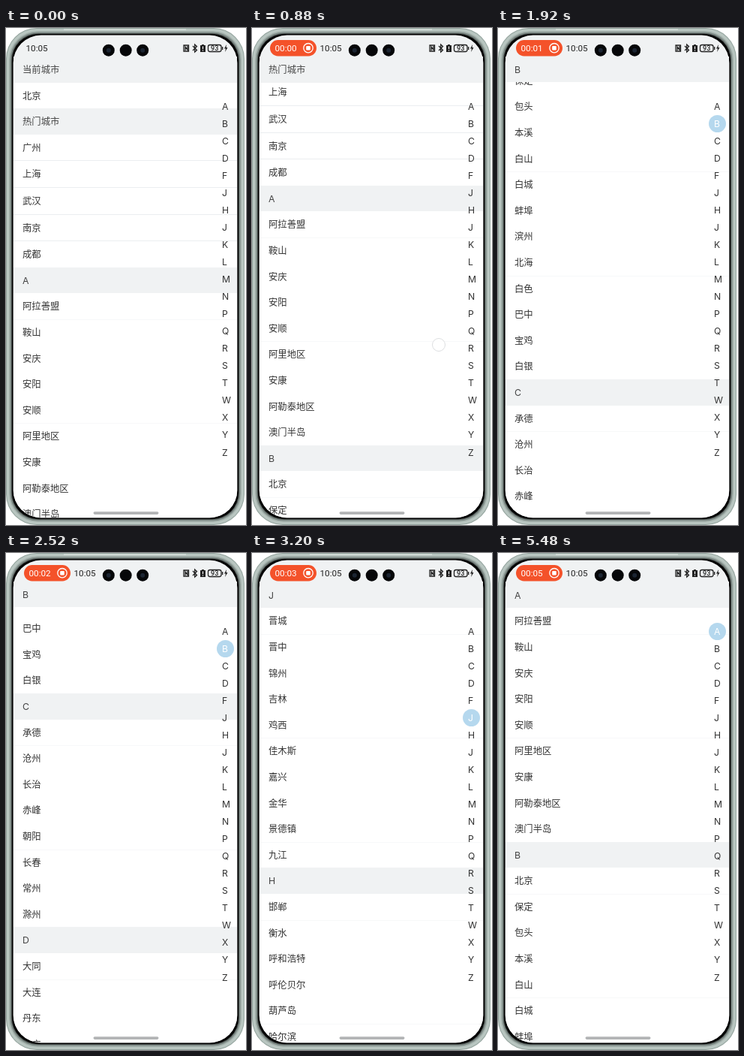
These frames come from a looping animation (320 px wide and 662 px high, 5640 ms). An HTML page:

```html
<!DOCTYPE html>
<html lang="zh">
<head>
<meta charset="utf-8">
<style>
html, body { margin: 0; width: 100%; height: 100%; overflow: hidden; background: #fff; }
body { position: relative; font: 12.35px Inter, "Noto Sans CJK SC", "Noto Sans CJK", sans-serif; color: #333; }
svg { position: absolute; left: 0; top: 0; }
#list { position: absolute; left: 10px; top: 38px; width: 298px; height: 614px; overflow: hidden;
  background: #fff; border-radius: 0 0 36px 36px; }
h2, p { margin: 0; height: 34.6px; padding-left: 12px; font: inherit; line-height: 35.4px; white-space: nowrap; }
h2 { position: sticky; top: 0; background: #f0f2f3; color: #444; }
p:nth-of-type(4n+2) { box-shadow: inset 0 1px #f7f8f9; }
.lined p + p { border-top: .75px solid #ebeef0; box-shadow: none; }
#index span { position: absolute; left: 280.5px; width: 15.5px; height: 23px; padding-left: 7.5px;
  border-radius: 50%; line-height: 23px; font-size: 12.2px; }
#index .on { background: #b5d8ee; color: #fff; }
#dot { position: absolute; left: 240px; width: 16px; height: 16px; border: 1px solid #dcdee0;
  border-radius: 50%; background: #fffc; }
#status text { font: 11.7px Roboto, sans-serif; }
</style>
</head>
<body>
<svg id="phone" width="320" height="662"></svg>
<div id="list"></div>
<div id="index"></div>
<div id="dot"></div>
<svg id="status" width="320" height="662">
  <g id="pill">
    <rect x="24" y="16" width="62" height="21.5" rx="10.75" fill="#f4522a"/>
    <text id="timer" x="30.5" y="30.7" fill="#fff"></text>
    <circle cx="75" cy="26.7" r="6.2" fill="none" stroke="#fff" stroke-width="1.3"/>
    <rect x="72.2" y="23.9" width="5.6" height="5.6" rx="1" fill="#fff"/>
  </g>
  <text id="clock" y="30.7" fill="#222">10:05</text>
  <g fill="#060709">
    <circle cx="136.8" cy="29.7" r="8"/><circle cx="159.7" cy="29.7" r="8"/><circle cx="182.2" cy="29.7" r="8"/>
  </g>
  <g fill="#1c2532"><circle cx="136.8" cy="29.7" r="3"/><circle cx="182.2" cy="29.7" r="3"/></g>
  <g fill="none" stroke="#222" stroke-width="1.3">
    <path d="M237 31V23H243.5V31ZM239 30V25L242 29V24"/>
    <path d="M249 24L254.5 29.5L251.7 32V22L254.5 24.5L249 30"/>
    <rect x="269.5" y="22.5" width="17.5" height="9" rx="2.5"/>
    <path d="M288.7 25V29"/>
  </g>
  <path d="M259 23H261V22H264V23H266V32H259Z" fill="#222"/>
  <path d="M262.5 24.5V28M262.5 29.3V30.6" stroke="#fff" stroke-width="1.1"/>
  <path d="M294 22L291 27.5H293L292 32L295.5 26H293.5Z" fill="#222"/>
  <text x="278.2" y="30.3" text-anchor="middle" fill="#222" style="font-size:9px;font-weight:500">93</text>
  <rect x="116.5" y="644.3" width="87" height="3.6" rx="1.8" fill="#b2b4b5"/>
</svg>
<script>
const $ = id => document.getElementById(id);
const LOOP = 5640;
const groups = `当前城市 北京
热门城市 广州 上海 武汉 南京 成都
A 阿拉善盟 鞍山 安庆 安阳 安顺 阿里地区 安康 阿勒泰地区 澳门半岛
B 北京 保定 包头 本溪 白山 白城 蚌埠 滨州 北海 白色 巴中 宝鸡 白银
C 承德 沧州 长治 赤峰 朝阳 长春 常州 滁州
D 大同 大连 丹东 大庆 大兴安岭 东营 德州 东莞 德阳 达州 大理 德宏
F 抚顺 阜新 阜阳 福州 抚州 佛山 防城港
J 晋城 晋中 锦州 吉林 鸡西 佳木斯 嘉兴 金华 景德镇 九江
H 邯郸 衡水 呼和浩特 呼伦贝尔 葫芦岛 哈尔滨 鹤岗 黑河 淮安 杭州`.split("\n").map(g => g.split(" "));

// nested shells from the metal rim to the screen: inset, corner radius, colour
const shells = [[0, 41, "#93a39d"], [1, 40, "#b9c6c1"], [4, 38, "#a3b0ab"], [5.5, 37, "#7c8884"],
  [7, 36, "#454b49"], [8, 35, "#000"], [9.6, 37, "#f0f2f3"]];
$("phone").innerHTML = shells.map(([d, r, fill]) =>
  `<rect x="${d}" y="${d}" width="${318 - 2 * d}" height="${662 - 2 * d}" rx="${r}" fill="${fill}"/>`).join("")
  + `<path d="M77 2H240" stroke="#d0d9d5" stroke-width="2"/>`;

$("list").innerHTML = groups.map(([name, ...cities], i) =>
  `<section class="${i == 1 ? "lined" : ""}"><h2>${name}</h2>${cities.map(c => `<p>${c}</p>`).join("")}</section>`).join("");
$("index").innerHTML = [..."ABCDFJHJKLMNPQRSTWXYZ"].map((c, i) =>
  `<span style="top:${92.5 + i * 23.05}px">${c}</span>`).join("");

const origin = $("list").getBoundingClientRect().top;
const tops = [...$("list").children].map(s => s.getBoundingClientRect().top - origin);
const letters = [...$("index").children];

// [time, scroll offset] while swiping, then [time, group] for index taps
const swipe = [[600, 0], [880, 108.5], [1240, 335], [1920, 680.8], [2520, 961.7], [3160, 1190]];
const taps = [[3160, 7], [3700, 5], [4150, 4], [4820, 3], [5400, 2]];
const ticks = [940, 1960, 2940, 3900, 4900];

const clamp = x => Math.max(0, Math.min(1, x));

function slope(i) {
  const a = swipe[i - 1], b = swipe[i + 1];
  return a && b ? (b[1] - a[1]) / (b[0] - a[0]) : 0;
}

function swipeAt(t) {
  if (t <= swipe[0][0]) return 0;
  const i = swipe.findIndex(k => k[0] > t) - 1;
  const [t0, y0] = swipe[i], [t1, y1] = swipe[i + 1];
  const d = t1 - t0, u = (t - t0) / d, v = 1 - u;
  return y0 * v * v * (1 + 2 * u) + y1 * u * u * (3 - 2 * u)
    + d * u * v * (slope(i) * v - slope(i + 1) * u);
}

function draw(t) {
  const tap = taps.findLast(k => k[0] <= t);
  const y = tap ? tops[tap[1]] : swipeAt(t);
  $("list").scrollTop = y;

  const group = tap ? tap[1] : tops.findLastIndex(top => top <= y + .5);
  letters.forEach((s, i) => s.classList.toggle("on", i == group - 2));

  const open = 1 - (1 - clamp((t - 40) / 360)) ** 3;
  $("pill").setAttribute("transform", `translate(${24 * (1 - open)} 0) scale(${open} 1)`);
  $("pill").setAttribute("opacity", open);
  $("clock").setAttribute("x", 26.5 + 64 * open);
  $("timer").textContent = "00:0" + ticks.filter(s => s <= t).length;

  $("dot").style.top = 522.5 - y + "px";
  $("dot").style.opacity = clamp((t - 540) / 60) * clamp((1020 - t) / 100);
}

function frame() {
  draw(performance.now() % LOOP);
  requestAnimationFrame(frame);
}
frame();
</script>
</body>
</html>
```
